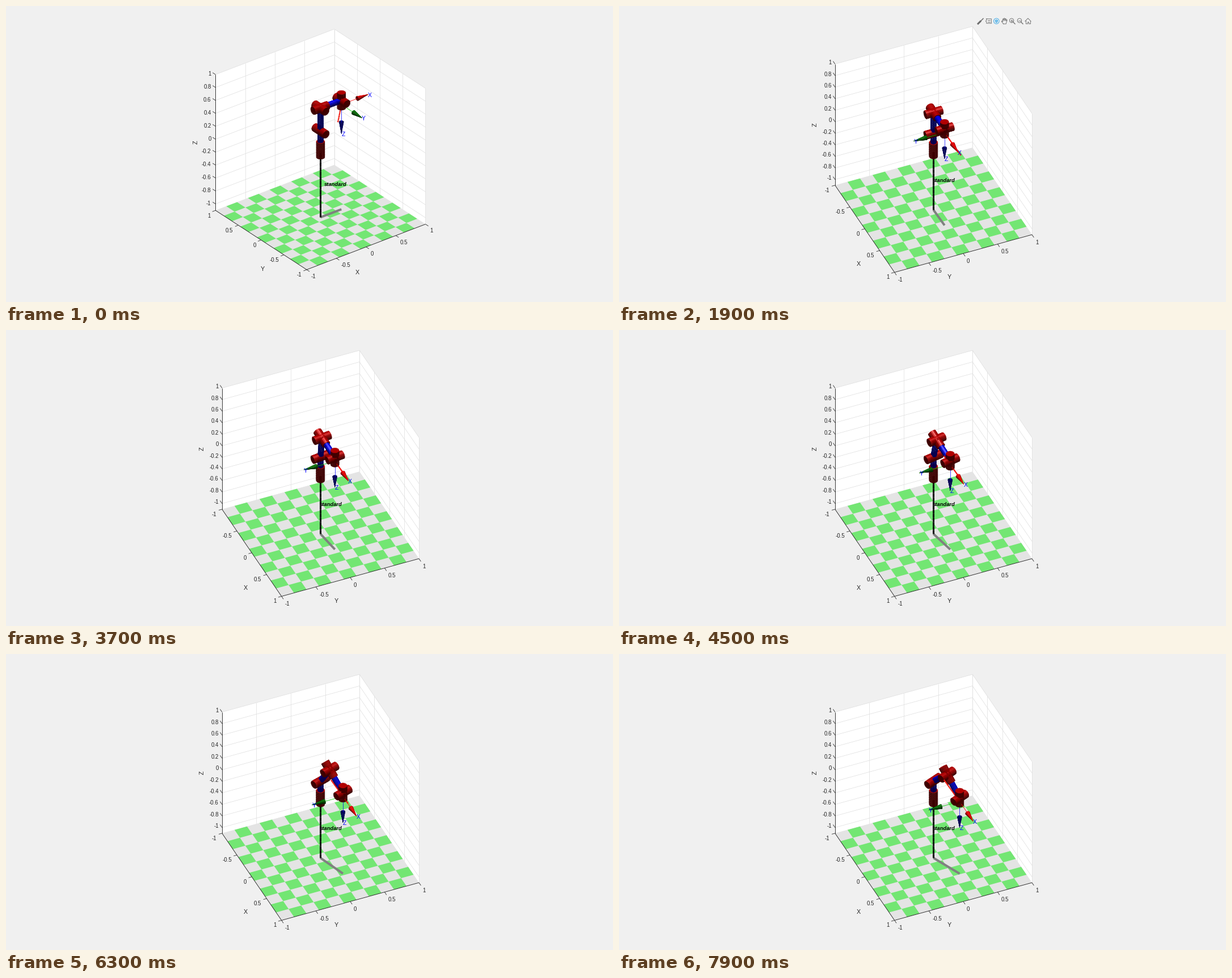
Animation, 1070 px wide and 523 px high, one loop 8000 ms. Source, as a matplotlib script:

```python
import numpy as np
import matplotlib.pyplot as plt
from matplotlib.animation import FuncAnimation
from matplotlib.collections import LineCollection, PolyCollection
from matplotlib.patches import Circle, Polygon

W, H, PX = 1070, 523, 0.72          # stage size, points per pixel
SCALE, CX, CY = 132, 554.4, 253.3   # orthographic scale and screen centre
FLOOR, TOP, TILES = -1.1, 1.0, 11
DARK, GRID = "#262626", "#dedede"
RED, BLUE, GREEN = (0.75, 0, 0), (0, 0, 1), (0, 0.8, 0)
DARK_GREEN = (0, 0.45, 0)

# Straight tool path and arm geometry
START, END = np.array([0.352, 0, 0.518]), np.array([0.45, 0.205, 0.118])
UP = np.array([0, 0, 1.0])
SHOULDER = np.array([0, 0, 0.235])
WRIST_UP, ARM, R_JOINT, R_LINK, HALF = 0.066, 0.355, 0.057, 0.038, 0.12

VIEWS = [(-37.5, 30), (-30, 30.8), (12, 34), (48, 37),
         (62.7, 38.45), (65.5, 39.1), (66.6, 39.4)]
STEPS = 49

plt.rcParams["font.family"] = "Liberation Sans"
fig = plt.figure(figsize=(W / 100, H / 100), dpi=100, facecolor="#f0f0f0")
ax = fig.add_axes([0, 0, 1, 1])
ax.set_xlim(0, W)
ax.set_ylim(H, 0)
ax.axis("off")


def unit(v):
    return np.asarray(v, float) / np.linalg.norm(v)


class Camera:
    def __init__(self, az, el):
        a, e = np.radians([az, el])
        sa, ca, se, ce = np.sin(a), np.cos(a), np.sin(e), np.cos(e)
        self.az = az
        self.axes = np.array([[ca, sa, 0], [sa * se, -ca * se, -ce]])
        self.eye = np.array([sa * ce, -ca * ce, se])

    def vec(self, v):
        return SCALE * np.asarray(v, float) @ self.axes.T

    def point(self, p):
        return self.vec(np.asarray(p, float) - [0, 0, -0.05]) + [CX, CY]


class Scene:
    """Depth-sorted polygons and line pieces."""

    def __init__(self, cam):
        self.cam, self.items = cam, []

    def add(self, pts, color, width=0.4):
        pts = np.asarray(pts)
        depth = pts.mean(axis=0) @ self.cam.eye
        self.items.append((depth, self.cam.point(pts), color, width))

    def shade(self, color, n, gloss):
        diffuse = max(n[2], 0)
        reflect = 2 * n[2] * n - UP
        shine = max(reflect @ self.cam.eye, 0) ** 10 if n[2] > 0 else 0
        return tuple(np.clip(np.array(color) * (0.32 + 0.6 * diffuse) + gloss * shine, 0, 1))

    def tube(self, p, q, r0, r1, color, sides=24, gloss=0.5):
        axis = q - p
        length = np.linalg.norm(axis)
        d = axis / length
        u = unit(np.cross(d, [0.31, 0.52, 0.8]))
        v = np.cross(d, u)
        ang = np.linspace(0, 2 * np.pi, sides + 1)
        ring = np.outer(np.cos(ang), u) + np.outer(np.sin(ang), v)
        pieces = max(1, round(length / 0.04)) if r1 else 1
        t = np.linspace(0, 1, pieces + 1)
        loops = [p + axis * s + ring * (r0 + (r1 - r0) * s) for s in t]
        for i in range(sides):
            n = unit(ring[i] + ring[i + 1] + 2 * d * (r0 - r1) / length)
            if n @ self.cam.eye <= 0:
                continue
            c = self.shade(color, n, gloss)
            for a, b in zip(loops, loops[1:]):
                self.add([a[i], a[i + 1], b[i + 1], b[i]], c)
        front = d @ self.cam.eye > 0
        if front and r1:
            self.add(loops[-1][:-1], self.shade(color, d, gloss))
        elif not front:
            # a cone is open at its base, so its inside shows
            self.add(loops[0][:-1], self.shade(color, -d if r1 else d, gloss))

    def joint(self, center, axis):
        self.tube(center - HALF * axis, center + HALF * axis, R_JOINT, R_JOINT, RED)

    def line(self, p, q, color, width, pieces=14):
        t = np.linspace(0, 1, pieces + 1)[:, None]
        pts = p + (q - p) * t
        for a, b in zip(pts, pts[1:]):
            self.add([a, b], color, width)

    def draw(self):
        self.items.sort(key=lambda item: item[0])
        _, polys, colors, widths = zip(*self.items)
        ax.add_collection(PolyCollection(
            polys, facecolors=colors, edgecolors=colors, zorder=5,
            linewidths=[w * PX for w in widths], joinstyle="round", capstyle="butt"))


def label(x, y, s, size=9.8, **kw):
    kw = {"color": DARK, "ha": "center", "va": "center", "zorder": 8, **kw}
    ax.text(x, y, s, fontsize=size * PX, **kw)


def lines(segs, color, width, z):
    ax.add_collection(LineCollection(segs, colors=color, linewidths=width * PX, zorder=z))


def draw_room(cam):
    side = 1 if cam.az < 0 else -1       # x of the visible side wall
    half = np.linspace(-1, 1, 5)
    fifth = np.round(np.linspace(-1, 1, 11), 1) + 0.0
    segs = []
    for wall in (lambda s, z: (s, 1, z), lambda s, z: (side, s, z)):
        corners = [wall(-1, FLOOR), wall(1, FLOOR), wall(1, TOP), wall(-1, TOP)]
        ax.add_patch(Polygon(cam.point(corners), fc="white", ec="none", zorder=1))
        segs += [cam.point([wall(s, FLOOR), wall(s, TOP)]) for s in half]
        segs += [cam.point([wall(-1, z), wall(1, z)]) for z in fifth]
    lines(segs, GRID, 0.7, 1.5)

    floor = cam.point([(-1, -1, FLOOR), (1, -1, FLOOR), (1, 1, FLOOR), (-1, 1, FLOOR)])
    ax.add_patch(Polygon(floor, fc="#e4e4e4", ec="none", zorder=2))
    edge = np.linspace(-1, 1, TILES + 1)
    tiles = []
    for i in range(TILES):
        for j in range(TILES):
            if (i + j) % 2:
                x0, x1, y0, y1 = *edge[i:i + 2], *edge[j:j + 2]
                tiles.append(cam.point([(x0, y0, FLOOR), (x1, y0, FLOOR),
                                        (x1, y1, FLOOR), (x0, y1, FLOOR)]))
    ax.add_collection(PolyCollection(tiles, facecolors="#73e673", edgecolors="none", zorder=2.1))

    x_pts = [(v, -1, FLOOR) for v in half]
    y_pts = [(-side, v, FLOOR) for v in half]
    x_side, y_side = ("right", "left") if side > 0 else ("left", "right")
    draw_axis(cam, "X", half, x_pts, (0, -1, 0), x_side)
    draw_axis(cam, "Y", half, y_pts, (-side, 0, 0), y_side)
    z_corner = (-1, side)
    z_out = (0, 1, 0) if side > 0 else (-1, 0, 0)
    draw_axis(cam, "Z", fifth, [(*z_corner, v) for v in fifth], z_out, "z")
    lines([cam.point([(*z_corner, FLOOR), (*z_corner, TOP)])], DARK, 0.9, 3)


def draw_axis(cam, name, values, pts, out, side):
    base = cam.point(pts)
    ends = base + 6 * unit(cam.vec(out))
    dx, dy, ha = {"left": (-3.5, 7.3, "right"), "right": (2.7, 8.7, "left"),
                  "z": (-2.7, 2.5, "right")}[side]
    lines([[a, b] for a, b in zip(base, ends)], DARK, 0.8, 3)
    for v, (x, y) in zip(values, ends):
        label(x + dx, y + dy, f"{v:g}", ha=ha)

    mx, my = (base[0] + base[-1]) / 2
    if side == "z":
        x, y = cam.point((*pts[0][:2], -0.05))
        label(x - 35, y, name, 10.8, rotation=90)
        return
    lines([base[[0, -1]]], DARK, 0.9, 3)
    slope = abs(unit(base[-1] - base[0])[1])
    if side == "left":
        mx, my = mx + 3 - 49 * (slope - 0.545), my + 51 + 39 * (slope - 0.545)
    else:
        mx, my = mx - 16 + 89 * (slope - 0.357), my + 45 + 39 * (slope - 0.357)
    label(mx, my, name, 10.8)


def solve_elbow(wrist):
    """Elbow-up solution of the two equal arm links."""
    heading = unit([wrist[0], wrist[1], 0])
    reach = wrist - SHOULDER
    dist = np.linalg.norm(reach)
    r, z = reach @ heading, reach[2]
    rise = np.sqrt(max(ARM ** 2 - dist ** 2 / 4, 0)) / dist
    return SHOULDER + reach / 2 + rise * (-z * heading + r * UP), heading


def draw_arm(cam, tool):
    wrist = tool + WRIST_UP * UP
    elbow, heading = solve_elbow(wrist)
    hinge = np.cross(UP, heading)
    fore = unit(wrist - elbow)

    shadow = cam.point([(0, 0, FLOOR), (tool[0], tool[1], FLOOR)])
    ax.plot(*shadow.T, color="#808080", lw=4 * PX, solid_capstyle="butt", zorder=3.5)

    scene = Scene(cam)
    scene.line(np.array([0, 0, FLOOR]), np.array([0, 0, -0.1]), (0, 0, 0), 3)
    scene.line(START, END, (0.95, 0.08, 0.04), 2.2, 24)
    scene.joint(np.array([0, 0, -0.05]), UP)
    scene.tube(np.array([0, 0, 0.07]), SHOULDER, R_LINK, R_LINK, BLUE)
    scene.joint(SHOULDER, hinge)
    scene.tube(SHOULDER, elbow, R_LINK, R_LINK, BLUE)
    scene.joint(elbow, hinge)
    scene.joint(elbow, fore)
    scene.tube(elbow + HALF * fore, wrist, R_LINK, R_LINK, BLUE)
    scene.joint(wrist, hinge)
    scene.joint(wrist, UP)

    frame = (("X", (1, 0, 0), (1, 0, 0), (1, 0, 0)),
             ("Y", (0, -1, 0), GREEN, DARK_GREEN),
             ("Z", (0, 0, -1), BLUE, BLUE))
    for name, axis, line_color, cone_color in frame:
        axis = np.array(axis, float)
        tip, neck = tool + 0.449 * axis, tool + 0.265 * axis
        scene.line(tool, neck, line_color, 0.8)
        scene.tube(neck, tip, 0.031, 0, cone_color, 18, 0.1)
        x, y = cam.point(tip)
        label(x + 3.3, y + 1.7, name, 10.4, color="blue")
    scene.draw()

    x, y = cam.point((0, -0.035, -0.577))
    label(x + 3.2, y, "standard", 9.4, ha="left", color="black",
          weight="bold", style="italic")


def draw_toolbar(x0, y):
    gray, blue = "#6e6e6e", "#35a7e8"

    def stroke(cx, pts, color=gray, w=0.9):
        ax.plot(*(np.array(pts) + [cx, y]).T, color=color, lw=w * PX, zorder=9)

    def ring(cx, shift, r, color=gray):
        ax.add_patch(Circle((cx + shift, y + shift), r, fc="none", ec=color,
                            lw=0.9 * PX, zorder=9))

    brush, tip, turn, hand, plus, minus, home = x0 + 13.9 * np.arange(7)
    stroke(brush, [(-0.5, 0.5), (4.5, -4.5)], w=1.5)
    stroke(brush, [(-4.5, 4.5), (-0.5, 0.5)], w=3)
    stroke(tip, [(-3.5, -4), (5, -4), (5, 4), (-3.5, 4), (-3.5, 1.5), (-5, 0),
                 (-3.5, -1.5), (-3.5, -4)])
    for dy in (-1.5, 1.5):
        stroke(tip, [(-1, dy), (3, dy)])
    ring(turn, 0, 4.8, blue)
    stroke(turn, [(-2, -1.3), (0, -2.4), (2, -1.3), (2, 1.3), (0, 2.4), (-2, 1.3),
                  (-2, -1.3), (0, 0), (2, -1.3)], blue)
    stroke(turn, [(0, 0), (0, 2.4)], blue)
    stroke(hand, [(-1.5, 5), (-5, 0.5), (-4, -0.5), (-2.5, 1), (-3, -3.5), (-1.7, -4),
                  (-0.8, -0.8), (-0.6, -5), (0.8, -5), (1, -0.8), (2, -4.3), (3, -4),
                  (2.8, -0.3), (4, -2.5), (5, -2), (3.5, 3), (3, 5), (-1.5, 5)])
    for cx in (plus, minus):
        ring(cx, -1, 3.7)
        stroke(cx, [(1.7, 1.7), (5, 5)], w=1.3)
        stroke(cx, [(-3, -1), (1, -1)])
    stroke(plus, [(-1, -3), (-1, 1)])
    stroke(home, [(-5.2, 0.3), (0, -5), (5.2, 0.3)])
    stroke(home, [(-3.6, -1), (-3.6, 4.7), (-1.2, 4.7), (-1.2, 1), (1.2, 1),
                  (1.2, 4.7), (3.6, 4.7), (3.6, -1)])


def update(frame):
    for group in (ax.collections, ax.patches, ax.lines, ax.texts):
        for artist in list(group):
            artist.remove()
    step = 0 if frame < 5 else (frame - 5) // 2 + 1
    u = step / STEPS
    s = u ** 3 * (10 - 15 * u + 6 * u * u)
    cam = Camera(*VIEWS[min(step, len(VIEWS) - 1)])
    draw_room(cam)
    draw_arm(cam, START + (END - START) * s)
    if 1 <= step < 7:
        draw_toolbar(649, 31.5)
    elif 7 <= step < 14:
        draw_toolbar(637.5, 26.7)
    return []


anim = FuncAnimation(fig, update, frames=80, interval=100, repeat=True,
                     repeat_delay=0, blit=False)
plt.show()
```
